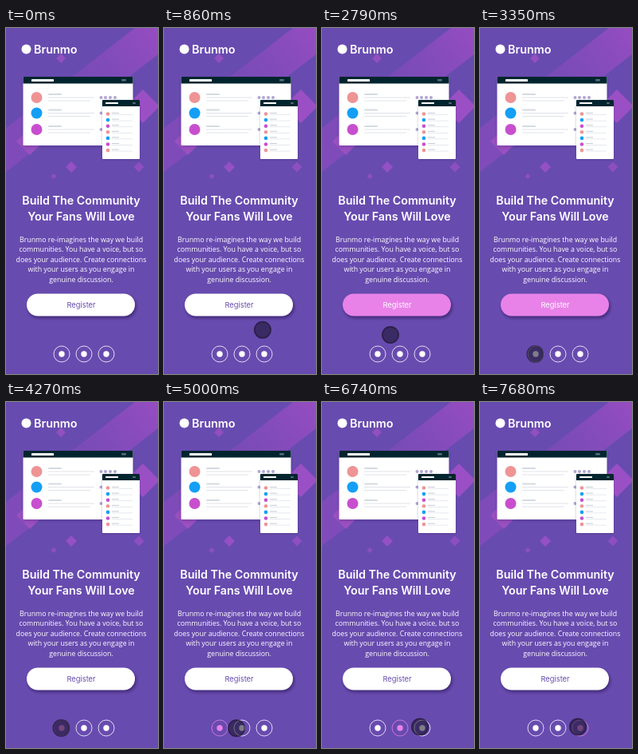
An HTML page with a canvas that plays this animation: 191x433 px, repeating every 8 s.

```html
<!DOCTYPE html>
<html lang="en">
<head>
<meta charset="utf-8">
<title>Community landing page</title>
<style>
html, body { margin: 0; width: 100%; height: 100%; overflow: hidden; background: #684baf; }
canvas { display: block; width: 191px; height: 433px; }
</style>
</head>
<body>
<canvas id="stage"></canvas>
<script>
const W = 191, H = 433, LOOP = 8000;
const PURPLE = '#684baf', PINK = '#e882e8', DARK = '#00252e';
const CORAL = '#ee9494', BLUE = '#149ff5', MAGENTA = '#c74fce';
const PEOPLE = [CORAL, BLUE, MAGENTA];
const HEAD = 'Inter, "DejaVu Sans", sans-serif';
const BODY = '"Open Sans", "Noto Sans", sans-serif';
const BRAND = 'Brunmo';

const canvas = document.getElementById('stage');
const ctx = canvas.getContext('2d');
const scale = window.devicePixelRatio || 1;
canvas.width = W * scale;
canvas.height = H * scale;

function rect(x, y, w, h, color, r = 0) {
  ctx.fillStyle = color;
  ctx.beginPath();
  ctx.roundRect(x, y, w, h, r);
  ctx.fill();
}

function disc(x, y, r, color) {
  ctx.fillStyle = color;
  ctx.beginPath();
  ctx.arc(x, y, r, 0, Math.PI * 2);
  ctx.fill();
}

function ring(x, y, r, color, width) {
  ctx.strokeStyle = color;
  ctx.lineWidth = width;
  ctx.beginPath();
  ctx.arc(x, y, r, 0, Math.PI * 2);
  ctx.stroke();
}

function polygon(points, fill) {
  ctx.fillStyle = fill;
  ctx.beginPath();
  points.forEach(([x, y]) => ctx.lineTo(x, y));
  ctx.closePath();
  ctx.fill();
}

function diamond(x, y, r, color) {
  polygon([[x, y - r], [x + r, y], [x, y + r], [x - r, y]], color);
}

function text(str, x, y, font, color = '#fff', align = 'center') {
  ctx.font = font;
  ctx.fillStyle = color;
  ctx.textAlign = align;
  ctx.fillText(str, x, y);
}

function shadow(color, blur, x, y) {
  ctx.shadowColor = color;
  ctx.shadowBlur = blur * scale;
  ctx.shadowOffsetX = x * scale;
  ctx.shadowOffsetY = y * scale;
}

function drawBackdrop() {
  rect(0, 0, W, H, PURPLE);
  const glow = ctx.createLinearGradient(191, 0, 0, 155);
  glow.addColorStop(0, 'rgba(188,78,208,.55)');
  glow.addColorStop(.45, 'rgba(160,75,200,.3)');
  glow.addColorStop(1, 'rgba(160,75,200,.42)');
  polygon([[162, 0], [191, 0], [191, 33], [0, 180], [0, 125]], glow);
  diamond(69, 38, 6, '#9150bd');
  diamond(172, 98, 21, '#9a50c4');
  diamond(30, 142, 17, '#9a50c0');
  diamond(82, 174, 7, '#9450c4');
  diamond(60, 185.5, 3.5, '#8d4fc0');
  diamond(167, 174, 6.5, '#8d4fc0');
}

function drawDesktop() {
  shadow('rgba(40,20,90,.25)', 4, 0, 2);
  rect(21.5, 61, 138, 86, '#fff', 1);
  shadow('transparent', 0, 0, 0);
  rect(21.5, 61, 138, 8.5, DARK, [1, 1, 0, 0]);
  rect(32, 64, 28, 3, '#fff', .5);
  rect(145, 64, 6, 2.5, '#54707a', 1);
  [87, 106.5, 127].forEach((y, i) => {
    disc(38.5, y, 7, PEOPLE[i]);
    rect(53, y - 5, 17, 2, '#d5dae2', 1);
    rect(53, y - .5, 58, 1, '#dfe3e9');
    rect(53, y + 3.5, 53, 1, '#dfe3e9');
    disc(119.5, y, 2, '#b0a5d2');
  });
  for (let x = 125; x < 140; x += 6) disc(x, 87, 2, '#b0a5d2');
}

function drawPhone() {
  shadow('rgba(40,20,90,.3)', 3, 0, 1);
  rect(121, 90, 47, 74, '#fff', 1);
  shadow('transparent', 0, 0, 0);
  rect(121, 90, 47, 8, DARK, [1, 1, 0, 0]);
  rect(125, 93, 16, 2, '#fff', .5);
  rect(159, 93, 4, 2, '#54707a', 1);
  for (let i = 0; i < 7; i++) {
    const y = 107.5 + i * 7.6;
    disc(128, y, 2.3, PEOPLE[i % 3]);
    rect(133, y - 1.5, 9, 1, '#c5ccd6');
    rect(133, y + .6, 26, .8, '#dfe3e9');
  }
}

function drawCopy() {
  disc(25.5, 26.5, 6, '#fff');
  text(BRAND, 35, 31.5, '600 14.4px ' + HEAD, '#fff', 'left');
  ['Build The Community', 'Your Fans Will Love'].forEach((line, i) =>
    text(line, 94.5, 221 + i * 20, '600 14.3px ' + HEAD));
  [
    BRAND + ' re-imagines the way we build',
    'communities. You have a voice, but so',
    'does your audience. Create connections',
    'with your users as you engage in',
    'genuine discussion.'
  ].forEach((line, i) => text(line, 94.5, 268 + i * 12.4, '8.8px ' + BODY));
}

function drawButton(active) {
  shadow('rgba(35,15,80,.6)', 4, 1.5, 2.5);
  rect(26, 332.5, 136, 28, active ? PINK : '#fff', 14);
  shadow('transparent', 0, 0, 0);
  text('Register', 94.5, 350, '9.3px ' + HEAD, active ? '#fff' : PURPLE);
}

function drawSocial(active) {
  [70, 98, 126].forEach((x, i) => {
    const color = i === active ? PINK : '#fff';
    ring(x, 408, 10, color, .8);
    disc(x, 408, 3.7, color);
  });
}

// Tap start, then the highlighted link box.
const TAPS = [
  [1910, 26, 320, 137, 42],
  [3950, 55, 393, 30, 30],
  [5660, 83, 393, 30, 30],
  [7350, 110, 393, 30, 30]
];
const PRESS = 140, FADE = 180;

// Pointer path: time, x, y.
const PATH = [
  [650, 148, 402], [830, 128, 382], [1010, 104, 358], [1190, 95, 348],
  [2580, 95, 348], [2790, 86, 384], [3000, 76, 400], [3350, 69.5, 408],
  [4540, 69.5, 408], [4860, 86, 408.5], [5180, 97.5, 408],
  [6250, 97.5, 408], [6590, 121.5, 406.5], [6739, 121.5, 406.5], [6740, 123, 406.5],
  [LOOP, 123, 406.5]
];

function pointerAt(t) {
  const i = PATH.findIndex(p => p[0] > t);
  const [t0, x0, y0] = PATH[i - 1], [t1, x1, y1] = PATH[i];
  const k = (t - t0) / (t1 - t0);
  return [x0 + (x1 - x0) * k, y0 + (y1 - y0) * k];
}

function drawPointer(t) {
  if (t < PATH[0][0]) return;
  const [x, y] = pointerAt(t);
  const pressed = TAPS.some(([start]) => t >= start && t < start + PRESS);
  if (pressed) {
    disc(x, y, 11.5, 'rgba(212,208,45,.75)');
    disc(x, y, 8.5, 'rgba(125,118,20,.45)');
  } else {
    disc(x, y, 11, 'rgba(22,18,38,.55)');
    ring(x, y, 10, 'rgba(22,18,38,.4)', 1.6);
  }
}

function drawHighlight(t) {
  for (const [start, ...box] of TAPS) {
    const k = (t - start - PRESS) / FADE;
    if (k >= 0 && k < 1) rect(...box, `rgba(51,130,229,${.45 * (1 - k)})`);
  }
}

function draw(t) {
  ctx.setTransform(scale, 0, 0, scale, 0, 0);
  const active = TAPS.filter(([start]) => t >= start + PRESS).length - 1;
  drawBackdrop();
  drawDesktop();
  drawPhone();
  drawCopy();
  drawButton(active === 0);
  drawSocial(active - 1);
  drawHighlight(t);
  drawPointer(t);
}

const begin = performance.now();
function tick() {
  draw((performance.now() - begin) % LOOP);
  requestAnimationFrame(tick);
}
tick();
</script>
</body>
</html>
```
